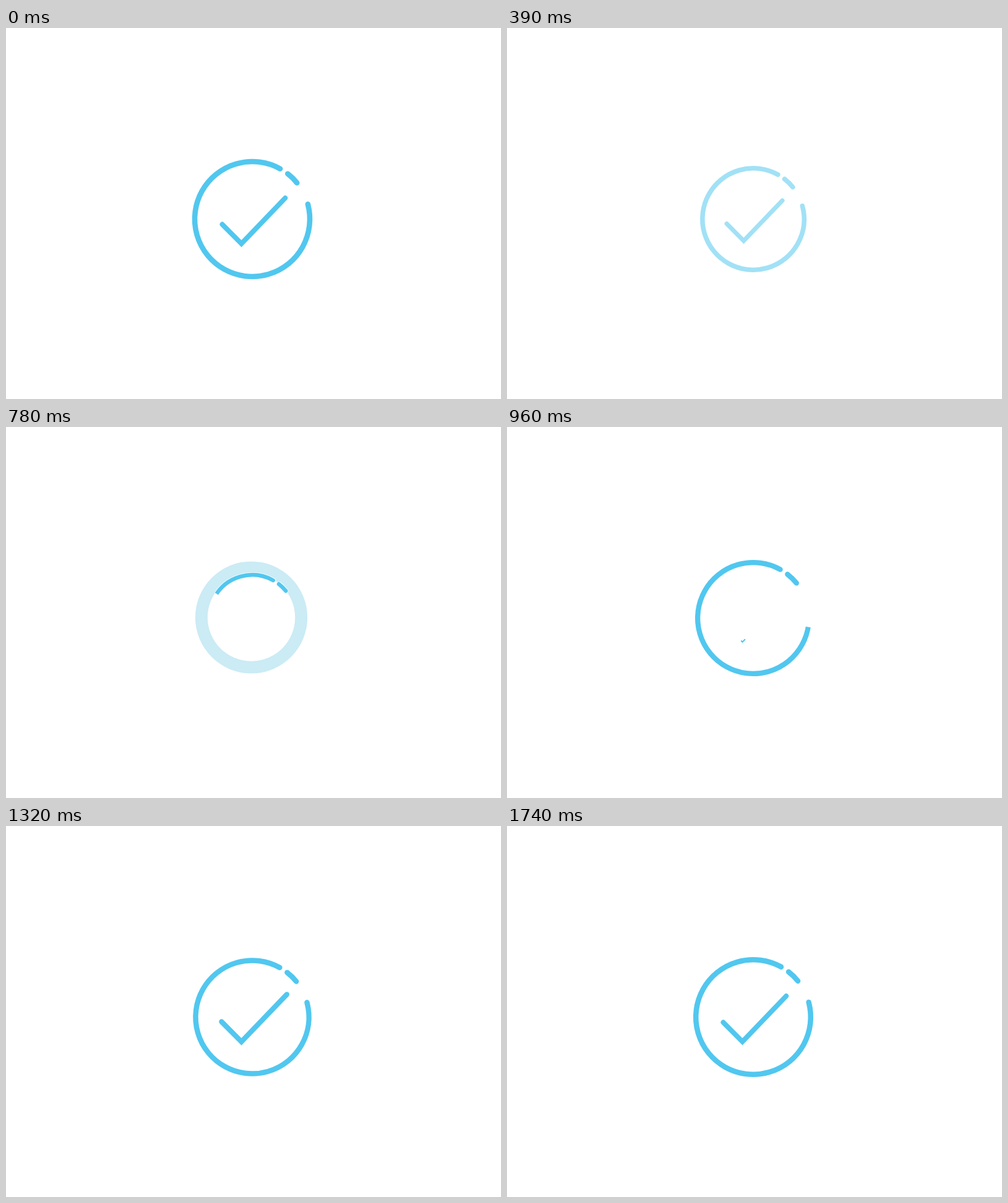
Recreate the animation shown at these times as an HTML page with a canvas. Size 800 px wide and 600 px high, loop 1.77 s.

```html
<!DOCTYPE html>
<html lang="en">
<head>
<meta charset="utf-8">
<title>Check mark</title>
<style>
  html, body { margin: 0; width: 100%; height: 100%; overflow: hidden; background: #fff; }
  canvas { display: block; }
</style>
</head>
<body>
<canvas id="stage" width="800" height="600"></canvas>
<script>
const ctx = document.getElementById('stage').getContext('2d');
const LOOP = 1770, STEP = 30;
const BLUE = '#51c7ef', PALE = '#cbebf5';
const CX = 398, CY = 309, RADIUS = 93;
const rad = deg => deg * Math.PI / 180;
const part = (t, start, length) => Math.min(1, Math.max(0, (t - start) / length));
const cubicOut = p => 1 - (1 - p) ** 3;
const sineInOut = p => (1 - Math.cos(Math.PI * p)) / 2;
const backIn = p => p * p * (2.70158 * p - 1.70158);

// Linear rise to 1 at `end`, then a damped swing around it.
function spring(t, end, speed, swing, freq) {
  const s = (t - end) / 1000;
  if (s < 0) return Math.max(0, 1 + speed * s);
  return 1 + swing * Math.exp(-4.5 * s) * Math.sin(2 * Math.PI * freq * s);
}

function scaled(x, y, scale, draw) {
  ctx.save();
  ctx.translate(x, y);
  ctx.scale(scale, scale);
  ctx.translate(-x, -y);
  draw();
  ctx.restore();
}

function strokeArcs(color, width) {
  ctx.strokeStyle = color;
  ctx.lineWidth = width;
  ctx.lineCap = 'round';
  for (const [from, to] of [[-61, -375], [-39, -52]]) {
    ctx.beginPath();
    ctx.arc(CX, CY, RADIUS, rad(from), rad(to), true);
    ctx.stroke();
  }
}

// The open circle, uncovered counterclockwise by a wedge.
function drawCircle(scale, shown, halo) {
  if (shown <= 0) return;
  scaled(CX, CY, scale, () => {
    if (shown < 1) {
      ctx.beginPath();
      ctx.moveTo(CX, CY);
      ctx.arc(CX, CY, 150, rad(-34), rad(-34 - 346 * shown), true);
      ctx.clip();
    }
    if (halo) strokeArcs('#fff', 11);
    strokeArcs(BLUE, 8.6);
  });
}

function drawCheck(scale) {
  if (scale <= 0) return;
  scaled(380.5, 347.7, scale, () => {
    ctx.strokeStyle = BLUE;
    ctx.lineWidth = Math.max(8, 2 / scale);
    ctx.lineCap = 'round';
    ctx.lineJoin = 'miter';
    ctx.beginPath();
    ctx.moveTo(349.5, 317.6);
    ctx.lineTo(380.5, 348.8);
    ctx.lineTo(451.2, 275);
    ctx.stroke();
  });
}

function drawBurst(t) {
  const outer = 100.5 * cubicOut(part(t, 570, 390));
  const inner = 100.5 * cubicOut(part(t, 690, 270));
  if (outer - inner < 0.1) return;
  ctx.fillStyle = PALE;
  ctx.beginPath();
  ctx.arc(396.5, 308, outer, 0, 2 * Math.PI);
  ctx.arc(396.5, 308, inner, 0, 2 * Math.PI, true);
  ctx.fill();
}

function render(t) {
  ctx.clearRect(0, 0, 800, 600);
  if (t < 450) {
    const p = part(t, 240, 210);
    ctx.globalAlpha = 1 - p ** 2.3;
    scaled(CX, CY, 1 - backIn(p), () => {
      drawCircle(1, 1);
      drawCheck(1);
    });
    ctx.globalAlpha = 1;
  } else if (t >= 600) {
    drawBurst(t);
    drawCircle(spring(t, 988, 1.2, 0.07, 2.3), sineInOut(part(t, 618, 421)), t < 960);
    drawCheck(spring(t, 1140, 5.25, 0.272, 2.5));
  }
}

const begin = performance.now();
function tick() {
  const t = (performance.now() - begin) % LOOP;
  render(Math.floor(t / STEP) * STEP);
  requestAnimationFrame(tick);
}
tick();
</script>
</body>
</html>
```
